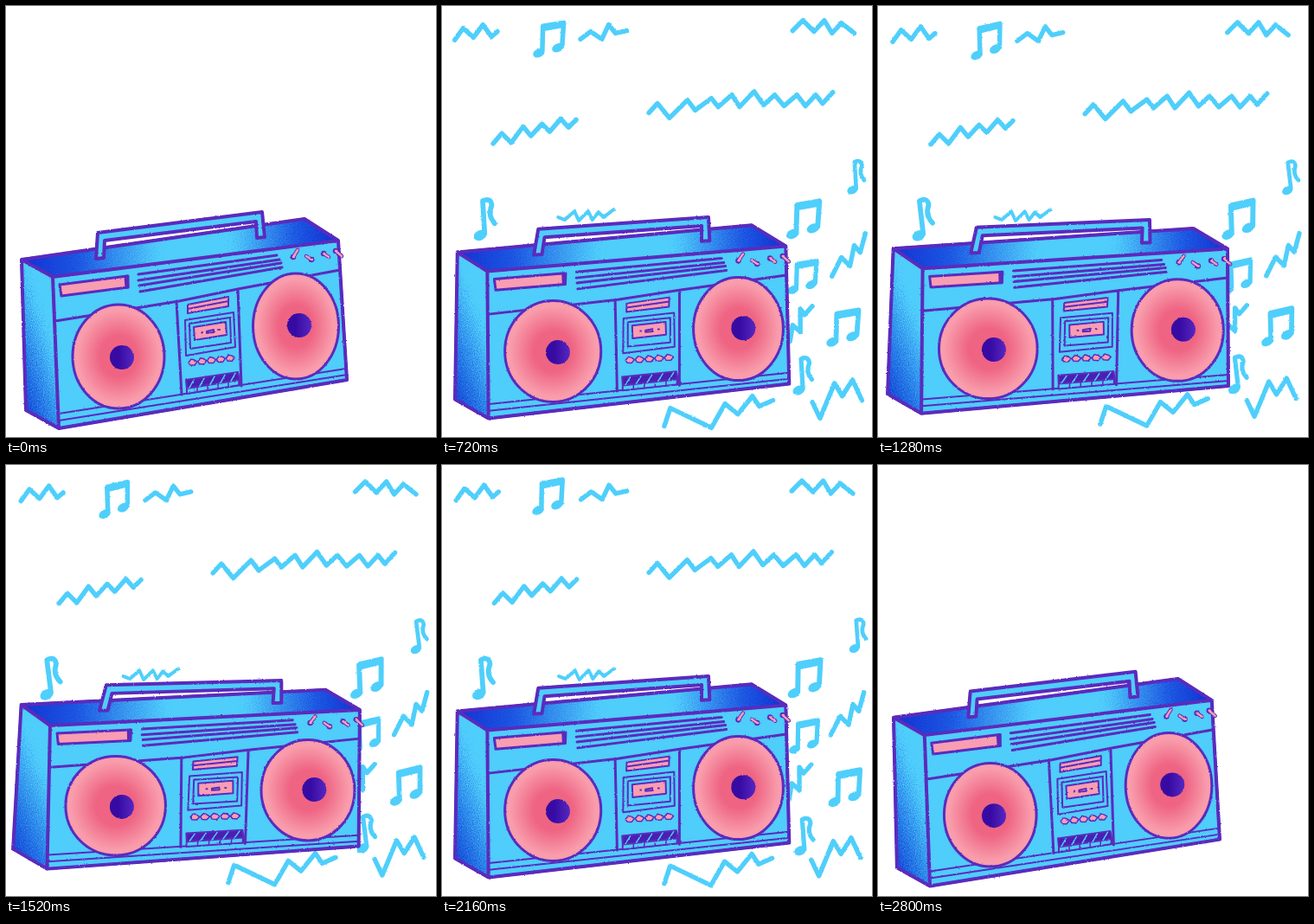
An HTML page that plays this animation: 497x498 px, repeating every 2880 ms.

```html
<!DOCTYPE html>
<html lang="en">
<head>
<meta charset="utf-8">
<title>Boombox</title>
<style>
  html, body { margin: 0; width: 100%; height: 100%; overflow: hidden; background: #fff; }
  svg { display: block; }
  .ink { fill: none; stroke: #5a2bbd; stroke-width: 3; stroke-linecap: round; stroke-linejoin: round; }
  .blue { fill: #4fcdfb; }
  .pink { fill: #f99db2; }
  .dark { fill: #4a1fb2; }
  .thin { stroke-width: 2; }
  .bold { stroke-width: 4; }
  .wave { fill: none; stroke: #4fcffb; stroke-width: 5.5; stroke-linejoin: round; stroke-linecap: round; }
</style>
</head>
<body>
<svg width="497" height="498" viewBox="0 0 497 498">
  <defs>
    <filter id="rough" filterUnits="userSpaceOnUse" x="0" y="0" width="497" height="498" color-interpolation-filters="sRGB">
      <feTurbulence type="fractalNoise" baseFrequency=".5" numOctaves="2" seed="4"/>
      <feDisplacementMap in="SourceGraphic" scale="2.2" xChannelSelector="R" yChannelSelector="G"/>
    </filter>
    <filter id="grain" filterUnits="userSpaceOnUse" x="0" y="200" width="497" height="298" color-interpolation-filters="sRGB">
      <feTurbulence type="fractalNoise" baseFrequency=".85" numOctaves="1" seed="9"/>
      <feDisplacementMap in="SourceGraphic" scale="55" xChannelSelector="R" yChannelSelector="G"/>
    </filter>
    <linearGradient id="side" x1=".2" y1=".9" x2=".6" y2=".55">
      <stop stop-color="#1238d0"/><stop offset=".4" stop-color="#2270e4"/><stop offset="1" stop-color="#4fcdfb"/>
    </linearGradient>
    <linearGradient id="lid">
      <stop offset=".07" stop-color="#1437d4"/><stop offset=".2" stop-color="#1c56e2"/><stop offset=".42" stop-color="#4fcdfb"/>
      <stop offset=".62" stop-color="#4fcdfb"/><stop offset=".8" stop-color="#1c56e2"/><stop offset=".9" stop-color="#1234d2"/>
    </linearGradient>
    <radialGradient id="cone">
      <stop offset=".4" stop-color="#ef6483"/><stop offset=".7" stop-color="#f4879b"/><stop offset=".9" stop-color="#f99dad"/>
    </radialGradient>
    <linearGradient id="hub">
      <stop offset=".35" stop-color="#370ba3"/><stop offset="1" stop-color="#5527c0"/>
    </linearGradient>
    <clipPath id="sideClip"><path d="M18 293L54 313L61 488L23 467Z"/></clipPath>
    <clipPath id="lidClip"><path d="M18 293L345 246L384 271L54 313Z"/></clipPath>
    <g id="double">
      <path d="M-8 16L-7-14L17-18L15 9M-6-11L16-15"/>
      <ellipse cx="-12" cy="17" rx="7" ry="4.8" transform="rotate(-25 -12 17)" fill="#4fcffb" stroke="none"/>
      <ellipse cx="10" cy="11" rx="7" ry="4.8" transform="rotate(-25 10 11)" fill="#4fcffb" stroke="none"/>
    </g>
    <g id="single">
      <path d="M0 17L-2-19Q7-23 8-14Q3-3 11 6"/>
      <ellipse cx="-5" cy="19" rx="7.5" ry="5.5" transform="rotate(-25 -5 19)" fill="#4fcffb" stroke="none"/>
    </g>
  </defs>

  <g id="sounds" class="wave" filter="url(#rough)">
    <g id="waves">
      <path d="M12 37L22 23L34 34L45 19L55 33L62 27"/>
      <path d="M159 36L171 27L184 36L192 19L200 29L213 26"/>
      <path d="M407 26L419 14L432 27L444 14L453 29L464 17L479 29"/>
      <path d="M239 122L249 111L263 128L284 107L293 119L312 105L320 115L336 101L345 115L362 97L373 113L386 101L397 114L412 101L422 114L434 101L442 111L454 98"/>
      <path d="M57 158L67 146L78 157L92 138L101 149L114 135L123 144L136 129L145 139L154 130"/>
      <path d="M133 244L141 247L152 237L157 248L168 237L173 247L180 238L186 244L198 235" stroke-width="4"/>
      <path d="M257 488L264 467L312 490L328 462L343 474L360 453L368 465L384 458"/>
      <path d="M453 313L464 291L474 301L479 277L486 285L492 263"/>
      <path d="M430 460L439 479L456 438L465 453L477 434L488 458"/>
      <path d="M404 389L407 370L416 378L416 351L421 358L430 348"/>
    </g>
    <g id="notes"></g>
  </g>

  <g filter="url(#rough)">
    <g id="radio" class="ink">
      <path class="blue" d="M18 293L345 246L384 271L394 432L61 488L23 467Z"/>
      <g clip-path="url(#sideClip)"><path d="M0 270L90 270L90 498L0 498Z" fill="url(#side)" stroke="none" filter="url(#grain)"/></g>
      <g clip-path="url(#lidClip)"><path d="M0 220L420 220L420 340L0 340Z" fill="url(#lid)" stroke="none" filter="url(#grain)"/></g>
      <path class="bold" d="M18 293L345 246L384 271L394 432L61 488L23 467ZM18 293L54 313L384 271M54 313L61 488"/>
      <path class="blue bold" d="M104 292L106 262L296 238L299 267L290 268L289 249L114 271L113 291Z"/>

      <path class="pink" d="M62 322L140 312L141 325L64 335Z"/>
      <path class="dark" d="M138 313L141 312L141 325L139 325Z"/>
      <path d="M153 310L313 288M153 317L316 293M154 323L318 297M155 330L319 302"/>
      <path d="M57 364L200 341L268 327L386 305M197 341L203 449M268 327L272 439"/>
      <path class="thin" d="M61 471L393 419M61 479L394 426"/>

      <path class="pink thin" d="M210 345L257 336L257 347L210 355ZM210 350L257 341"/>
      <path class="thin" d="M207 363L263 354L265 394L208 404ZM212 367L259 360L260 389L213 396Z"/>
      <path class="pink thin" d="M217 371L254 365L255 380L218 386Z"/>
      <path class="thin" d="M232 376L240 374L240 377L232 378ZM226 377L227 377M246 374L247 374"/>
      <g id="dials" class="pink" stroke-width="1.5"></g>
      <path class="dark thin" d="M208 432L268 423L270 432L209 442Z"/>
      <path class="blue thin" d="M209 442L270 432L270 438L209 448Z"/>
      <g id="keys" stroke-width="1.5"></g>
      <g id="screws"></g>
      <g id="speakers"></g>
    </g>
  </g>
</svg>
<script>
const FRAME = 80, FRAMES = 36, MID = 250;
const $ = id => document.getElementById(id);
const cycle = (n, period) => Math.cos(2 * Math.PI * n / period);
const five = draw => [0, 1, 2, 3, 4].map(draw).join('');

function add(parent, tag, attributes) {
  const node = document.createElementNS('http://www.w3.org/2000/svg', tag);
  set(node, attributes);
  return parent.appendChild(node);
}
function set(node, attributes) {
  for (const name in attributes) node.setAttribute(name, attributes[name]);
}

$('dials').innerHTML = five(i => {
  const x = 215 + i * 10.8, y = 412 - i * 1.2;
  return `<path d="M${x - 4} ${y}L${x - 1} ${y - 4}L${x + 3} ${y - 3}L${x + 6} ${y - 1}L${x + 3} ${y + 3}L${x - 2} ${y + 3}Z"/>`;
});
$('keys').innerHTML = five(i => {
  const x = 212 + i * 12, y = 441 - i * 1.9;
  return `<path stroke="#4fcdfb" d="M${x} ${y}L${x + 5} ${y - 9}"/><path d="M${x + 9} ${y - 1}L${x + 9} ${y + 5}"/>`;
});
$('screws').innerHTML = [[332, 290, 337, 282], [353, 293, 347, 289], [367, 286, 373, 290], [381, 283, 388, 289]].map(([x, y, x2, y2]) =>
  `<path d="M${x} ${y}L${x2} ${y2}" stroke-width="4.5"/>
   <path d="M${x} ${y}L${x} ${y}" stroke-width="6.5"/>
   <path d="M${x} ${y}L${x2} ${y2}M${x} ${y}L${x + 1} ${y}" stroke="#f99db2" stroke-width="2.5"/>`).join('');

const speakers = [
  { cone: [130, 405], rx: 53, ry: 60, hub: [134, 406] },
  { cone: [335, 370], rx: 49.5, ry: 61, hub: [339, 369] }
].map(s => ({
  ...s,
  disc: add($('speakers'), 'ellipse', { fill: 'url(#cone)' }),
  core: add($('speakers'), 'circle', { r: 14, fill: 'url(#hub)', stroke: 'none' })
}));
const panels = [...document.querySelectorAll('#radio path, clipPath path')]
  .map(node => ({ node, d: node.getAttribute('d') }));

// kind, x, y, size
const notes = [
  ['double', 123, 36, 1], ['double', 419, 245, 1.08], ['double', 418, 312, 0.95], ['double', 465, 371, 1.05],
  ['single', 48, 245, 1.05], ['single', 480, 196, 0.85], ['single', 418, 427, 0.95]
].map(([kind, x, y, size]) => ({ node: add($('notes'), 'use', { href: '#' + kind }), x, y, size }));

// Turns the box towards the viewer by k; the lid and handle swing a little further.
function warp(x, y, k) {
  const across = (x - 54) / 333, down = y - 313;
  const lid = Math.max(0, -down - 42 * across) / 30;
  const dx = -3 + 25 * across - (0.063 + 0.0115 * across) * down + 4.5 * (1 - across) * lid;
  const dy = -12 + 23 * across - (0.057 - 0.032 * across) * down + (7 * across - 2.5) * lid;
  return [x + k * dx, y + k * dy];
}

function drawRadio(k) {
  for (const { node, d } of panels) {
    set(node, { d: d.replace(/([\d.]+) ([\d.]+)/g, (_, x, y) => warp(+x, +y, k).join(' ')) });
  }
  for (const { cone, rx, ry, hub, disc, core } of speakers) {
    const [cx, cy] = warp(...cone, k), [hx, hy] = warp(...hub, k);
    set(disc, { cx, cy, rx: rx * (1 + 0.09 * k), ry: ry * (1 - 0.045 * k) });
    set(core, { cx: hx + 3 * k, cy: hy });
  }
}

function drawSounds(n) {
  $('sounds').style.display = n > 0 && n < FRAMES - 1 ? '' : 'none';
  const d = (n - 20) ** 2;
  const spread = 0.978 + 8e-5 * d + 8e-8 * d * d;
  set($('waves'), { transform: `translate(${MID} ${MID}) scale(${spread}) translate(${-MID} ${-MID})` });

  const drift = 1 - 0.012 * (cycle(n - 16, 32) + 0.3);
  const tilt = -2 * (1 + cycle(n - 19, 24));
  for (const { node, x, y, size } of notes) {
    const px = MID + (x - MID) * drift, py = MID + (y - MID) * drift;
    set(node, { transform: `translate(${px} ${py}) rotate(${tilt}) scale(${size})` });
  }
}

function draw() {
  const n = Math.floor(performance.now() / FRAME) % FRAMES;
  drawRadio((1 - cycle(n, 12)) / 1.866);
  drawSounds(n);
  requestAnimationFrame(draw);
}
draw();
</script>
</body>
</html>
```
